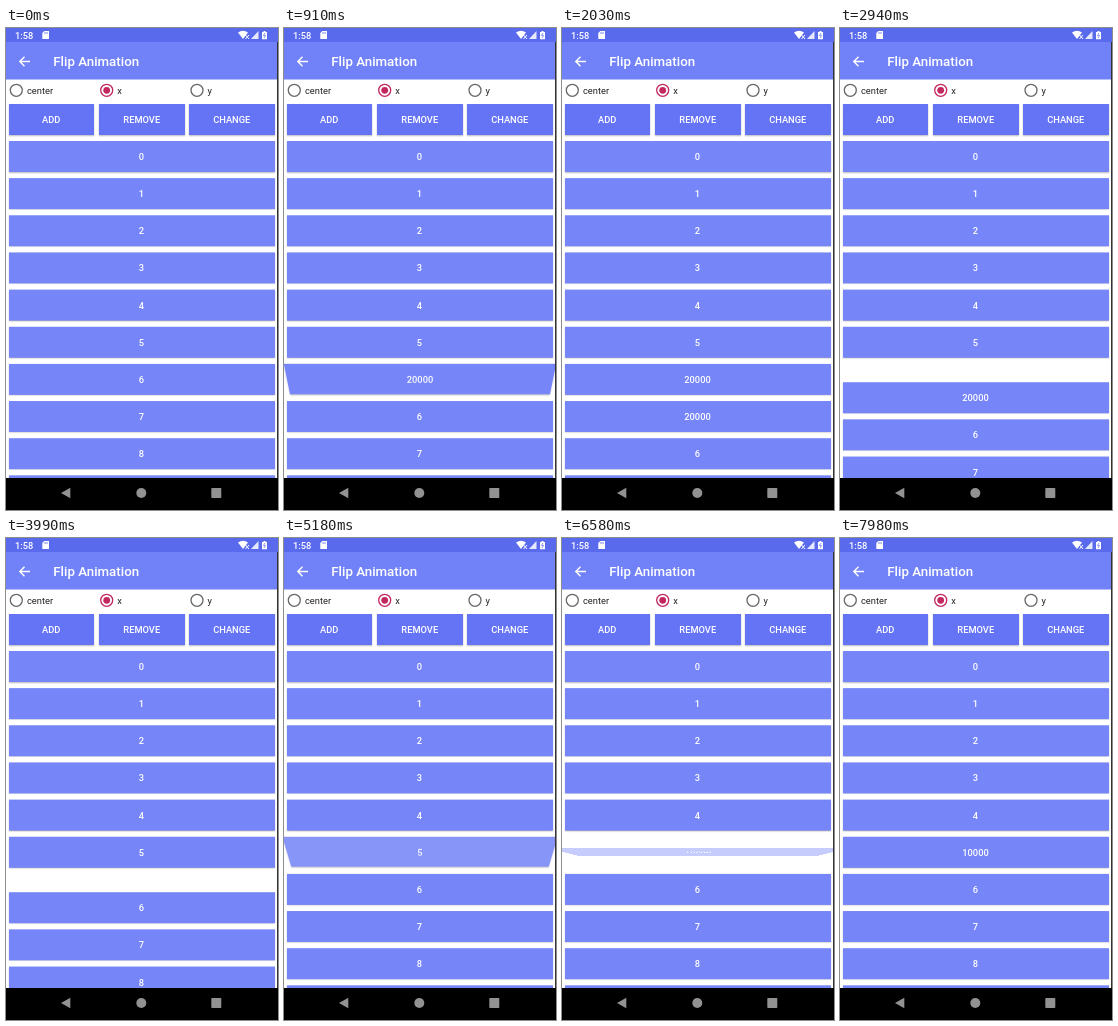
Animation of 272 by 482 pixels, one loop 8050 ms. Source, as an HTML page:

```html
<!DOCTYPE html>
<html lang="en">
<head>
<meta charset="utf-8">
<title>Flip Animation</title>
<style>
  html, body { margin: 0; width: 100%; height: 100%; overflow: hidden; background: #fff; }
  #stage { position: relative; width: 272px; height: 482px; overflow: hidden; background: #fff;
    font: 500 9.3px Roboto, sans-serif; color: #fff; }
  #chrome { position: absolute; left: 0; top: 0; }
  #list { position: absolute; left: 0; top: 109px; width: 272px; height: 341px; overflow: hidden; }
  .card { position: absolute; height: 31.3px; line-height: 31.5px; text-align: center;
    box-shadow: 0 1px 1.5px rgba(0, 0, 0, .28); }
  .row { left: 2.5px; top: 4px; width: 266px; background: #7685f8; }
  .button { top: 76px; width: 85.5px; background: #6574f5; }
</style>
</head>
<body>
<div id="stage">
  <div class="card button" style="left:2.5px">ADD</div>
  <div class="card button" style="left:93px">REMOVE</div>
  <div class="card button" style="left:183px">CHANGE</div>
  <div id="list"></div>
  <svg id="chrome" width="272" height="482" fill="#fff">
    <rect width="272" height="51.5" fill="#7182f9"/>
    <rect width="272" height="14" fill="#5a6aed"/>
    <text x="9" y="10.5">1:58</text>
    <path d="M38.3 3h4.7v8h-6.7V5z"/>
    <path d="M39 4v2M41 4v2" stroke="#5a6aed" stroke-width=".8"/>
    <path d="M232 4.5q5-3.4 10 0l-5 6.5z"/>
    <path d="M239.5 7l3.5 4M243 7l-3.5 4" stroke="#fff"/>
    <path d="M252.5 3v8h-7.5z" opacity=".85"/>
    <path d="M256 4h1.5V3h2v1h1.5v7.300h-5z"/>
    <path d="M259 5l-1.500 2.500h2l-1.500 2.500" fill="none" stroke="#5a6aed" stroke-width=".7"/>
    <path d="M24 33.500H14M18.500 28.800L13.800 33.500L18.500 38.200" fill="none" stroke="#fff" stroke-width="1.4"/>
    <text x="47.3" y="38.300" font-size="13.3">Flip Animation</text>
    <g fill="none" stroke="#686868" stroke-width="1.3">
      <circle cx="10.300" cy="62.300" r="6"/>
      <circle cx="100.700" cy="62.300" r="6" stroke="#c2285f"/>
      <circle cx="191" cy="62.300" r="6"/>
    </g>
    <circle cx="100.700" cy="62.300" r="3.400" fill="#c2285f"/>
    <g fill="#222" font-weight="400">
      <text x="21" y="65.700">center</text>
      <text x="111.300" y="65.700">x</text>
      <text x="201.600" y="65.700">y</text>
    </g>
    <rect x="271" y="14" width="1" height="436" fill="#333"/>
    <rect y="450" width="272" height="32" fill="#000"/>
    <g fill="#929292">
      <path d="M55 465l9.300-5.300v10.600z"/>
      <circle cx="135.300" cy="465" r="5"/>
      <rect x="205.300" y="460" width="10" height="10" rx=".7"/>
    </g>
  </svg>
</div>
<script>
const LOOP = 8050, PITCH = 37.15;
const MOVE = 250, POP = 120, FLIP = 250;
const ADDS = [568, 1430];
const REMOVES = [2695, 3745];
const CHANGES = [5113, 5760, 6398, 6965];

const list = document.getElementById('list');

function addRow(label) {
  const row = document.createElement('div');
  row.className = 'card row';
  row.textContent = label;
  list.append(row);
  return row;
}

const fixed = [0, 1, 2, 3, 4].map(addRow);
const changing = addRow('5');
const tail = [6, 7, 8, 9].map(addRow);
const first = addRow('20000');
const second = addRow('20000');

// Accelerates, then decelerates, from 0 to 1.
function ease(t, start, duration) {
  const p = Math.min(1, Math.max(0, (t - start) / duration));
  return (1 - Math.cos(Math.PI * p)) / 2;
}

function place(row, slot, turn = 0, opacity = 1) {
  const flip = turn ? ` perspective(125px) rotateX(${-90 * turn}deg)` : '';
  row.style.transform = `translateY(${slot * PITCH}px)${flip}`;
  row.style.opacity = opacity;
  row.style.visibility = turn < 1 ? 'visible' : 'hidden';
}

function placeInserted(row, slot, t, added, removed) {
  const enter = ease(t, added + MOVE, POP);
  const leave = ease(t, removed, POP);
  place(row, slot, 1 - enter + leave, 1 - 0.7 * leave);
}

function placeChanging(t) {
  const start = CHANGES.findLast(time => time <= t);
  const leave = start ? ease(t, start, FLIP) : 0;
  const enter = start ? ease(t, start + FLIP, FLIP) : 0;
  const leaving = enter === 0;
  changing.textContent = t < CHANGES[0] + FLIP ? '5' : '10000';
  place(changing, 5, leave - enter, leaving ? 1 - 0.7 * leave : 1);
}

function render(t) {
  const opened = ADDS.map(time => ease(t, time, MOVE));
  const closed = REMOVES.map(time => ease(t, time + POP, MOVE));
  const shift = opened[0] + opened[1] - closed[0] - closed[1];

  tail.forEach((row, i) => place(row, 6 + i + shift));
  placeInserted(first, 6 + opened[1] - closed[0], t, ADDS[0], REMOVES[1]);
  placeInserted(second, 6, t, ADDS[1], REMOVES[0]);
  placeChanging(t);
}

fixed.forEach((row, i) => place(row, i));
const origin = performance.now();

function tick() {
  render((performance.now() - origin) % LOOP);
  requestAnimationFrame(tick);
}
tick();
</script>
</body>
</html>
```
